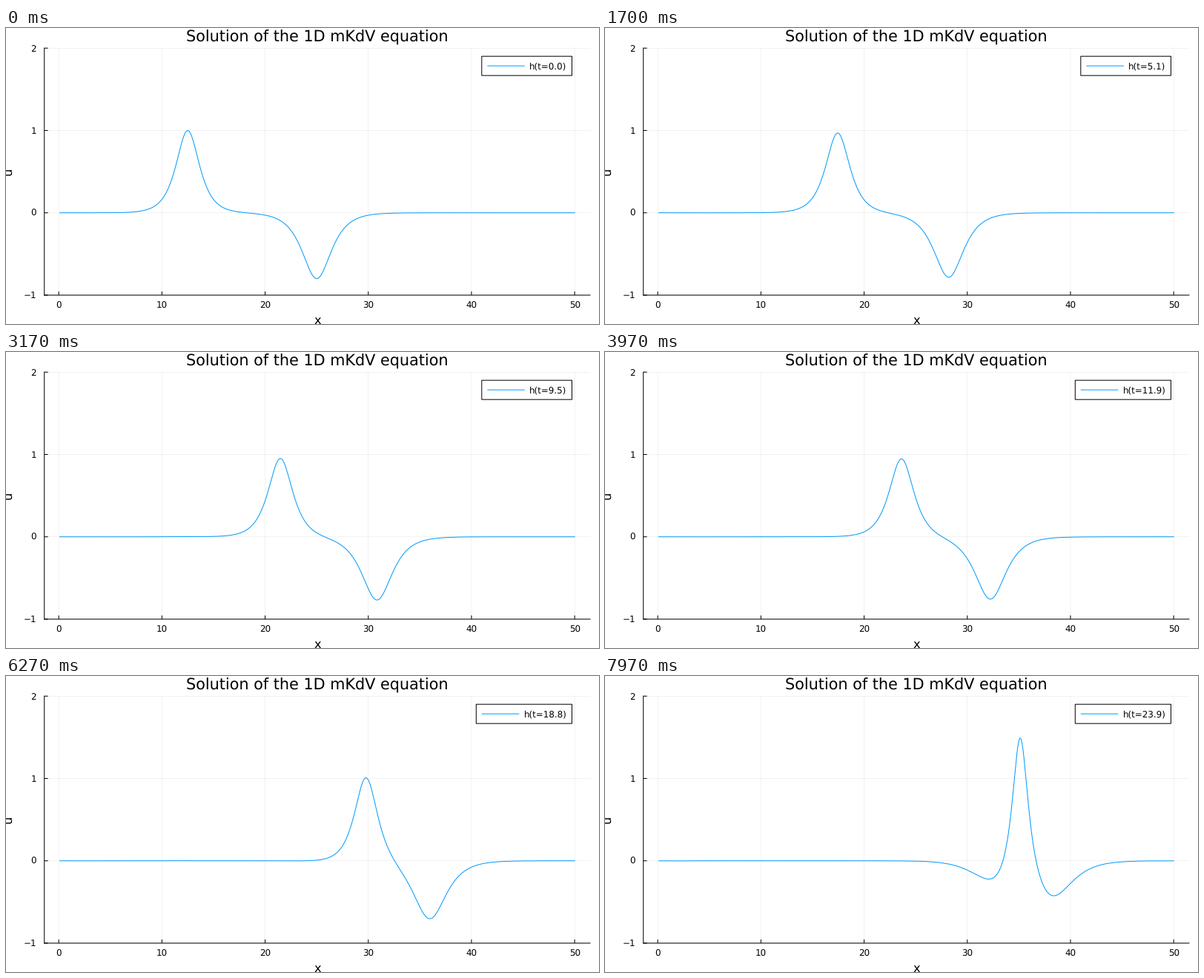
Write a matplotlib script that moves like this. It is 800 px wide and 400 px high and loops after 8000 ms.

```python
import numpy as np
import matplotlib.pyplot as plt
from matplotlib.animation import FuncAnimation
from matplotlib.patches import Rectangle

W, H, DPI = 800, 400, 100
PT = 72 / DPI
FRAMES, LOOP = 240, 8000
LEFT, RIGHT, TOP, BOTTOM = 51.7, 788.0, 27.2, 361.0
BLUE = "#009afa"
plt.rcParams["font.family"] = "DejaVu Sans"
plt.rcParams["text.hinting"] = "none"


def solve(n=500, length=50.0, nu=0.01, steps=20, dt_out=0.1):
    """u_t + 6 u^2 u_x + u_xxx = nu u_xx, integrating factor RK4."""
    x = length / n * np.arange(1, n + 1)
    u = 1 / np.cosh(x - 12.5) - 0.8 / np.cosh(0.8 * (x - 25))
    k = 2 * np.pi * np.fft.rfftfreq(n, length / n)
    dt = dt_out / steps
    half = np.exp((1j * k**3 - nu * k**2) * dt / 2)
    full = half**2

    def slope(v):
        return -2j * k * dt * np.fft.rfft(np.fft.irfft(v, n) ** 3)

    v = np.fft.rfft(u)
    waves = [u]
    for _ in range(FRAMES - 1):
        for _ in range(steps):
            a = slope(v)
            b = slope(half * (v + a / 2))
            c = slope(half * v + b / 2)
            d = slope(full * v + half * c)
            v = full * v + (full * a + 2 * half * (b + c) + d) / 6
        waves.append(np.fft.irfft(v, n))
    return x, waves


x, waves = solve()
pad = 0.03 * (x[-1] - x[0])


def to_px(value):
    return LEFT + (value - x[0] + pad) / (x[-1] - x[0] + 2 * pad) * (RIGHT - LEFT)


def to_py(value):
    return BOTTOM - (value + 1) / 3 * (BOTTOM - TOP)


# Axes in stage pixels, y pointing down
fig = plt.figure(figsize=(W / DPI, H / DPI), dpi=DPI, facecolor="white")
ax = fig.add_axes([0, 0, 1, 1])
ax.set(xlim=(0, W), ylim=(H, 0))
ax.axis("off")


def stroke(xs, ys, color="black", width=1.0, **kw):
    return ax.plot(xs, ys, color=color, linewidth=width * PT, snap=False, **kw)[0]


def label(px, py, text, size, ha="center", **kw):
    return ax.text(px, py, text, fontsize=size * PT, ha=ha, va="baseline", **kw)


for value in range(0, 51, 10):
    px = to_px(value)
    stroke([px, px], [TOP, BOTTOM], width=0.5, alpha=0.1)
    stroke([px, px], [BOTTOM, BOTTOM - 5], solid_capstyle="butt")
    label(px, 378.5, str(value), 11.85)
for value in range(-1, 3):
    py = to_py(value)
    stroke([LEFT, RIGHT], [py, py], width=0.5, alpha=0.1)
    stroke([LEFT, LEFT + 5], [py, py], solid_capstyle="butt")
    label(41, py + 4.3, str(value).replace("-", "\u2212"), 11.85, ha="right")
stroke([LEFT, LEFT], [TOP, BOTTOM])
stroke([LEFT, RIGHT], [BOTTOM, BOTTOM])

label(420, 18.5, "Solution of the 1D mKdV equation", 20.75)
label(420, 399.7, "x", 16.3)
label(8.4, 194, "u", 16.3, rotation=90, rotation_mode="anchor")

curve = stroke(to_px(x), to_py(waves[0]), BLUE)
box = ax.add_patch(Rectangle((0, 38.2), 0, 26, facecolor="white", edgecolor="black",
                             linewidth=PT, snap=False, zorder=3))
sample = stroke([0, 0], [51.2, 51.2], BLUE, zorder=4)
caption = label(0, 55, "", 11.85, ha="left", zorder=4)


def draw(i):
    curve.set_ydata(to_py(waves[i]))
    edge = 641.8 if i < 100 else 634.3
    box.set_x(edge)
    box.set_width(763.5 - edge)
    sample.set_xdata([edge + 8, edge + 57.5])
    caption.set_x(edge + 64.2)
    caption.set_text(f"h(t={i / 10:.1f})")
    return curve, box, sample, caption


anim = FuncAnimation(fig, draw, frames=FRAMES, interval=LOOP / FRAMES,
                     init_func=lambda: draw(0), repeat=True, repeat_delay=0)
plt.show()
```
